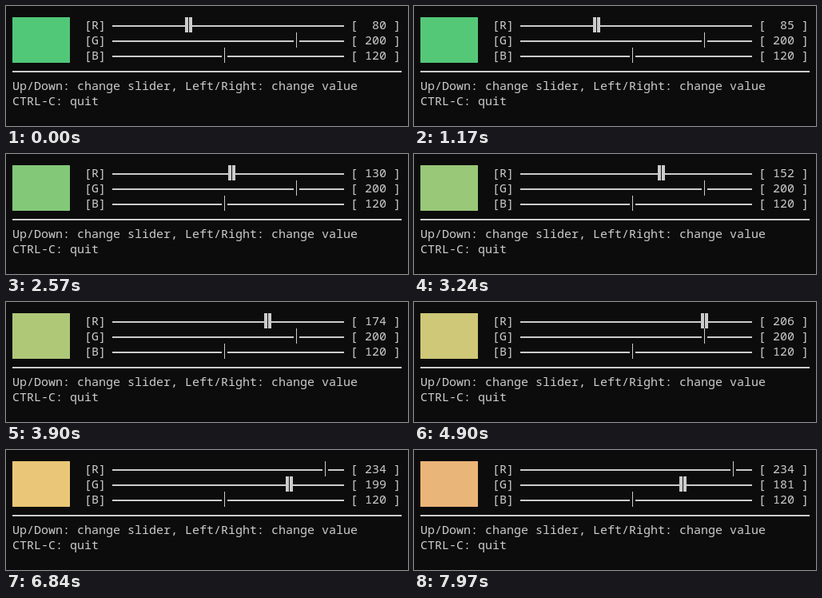
Write an HTML page that moves like this. It is 503x150 px and loops after 8 s.

```html
<!DOCTYPE html>
<html lang="en">
<head>
<meta charset="utf-8">
<title>Colour sliders</title>
<style>
html, body { margin: 0; width: 100%; height: 100%; overflow: hidden; background: #0c0c0c; }
svg { display: block; width: 503px; height: 150px; }
rect { shape-rendering: crispEdges; }
text { font: 500 15px "Noto Sans Mono", "DejaVu Sans Mono", monospace; fill: #ccc; }
</style>
</head>
<body>
<svg id="stage" viewBox="0 0 503 150"></svg>
<script>
const LOOP = 8000, CELL = 9, ROW = 19, LEFT = 8, TOP = 14;
const BG = '#0c0c0c', FG = '#cccccc';
const CELLS = 32, MAX = 255;
const RATE = 13 / 6; // value change per screen refresh while a key is held
const stage = document.getElementById('stage');

const colX = col => LEFT + col * CELL;
const rowY = row => TOP + row * ROW;

function add(tag, attrs) {
  const el = document.createElementNS('http://www.w3.org/2000/svg', tag);
  set(el, attrs);
  return stage.appendChild(el);
}
function set(el, attrs) {
  for (const key in attrs) el.setAttribute(key, attrs[key]);
}
function rect(x, y, width, height, fill) {
  return add('rect', { x, y, width, height, fill });
}
function label(col, row, str, anchor = 'start') {
  const el = add('text', { x: colX(col), y: rowY(row) + 15, 'text-anchor': anchor });
  el.textContent = str;
  return el;
}
function rule(col, row, cells) {
  rect(colX(col) - 1, rowY(row) + 10, cells * CELL + 2, 2, FG);
}

rect(0, 0, 503, 150, BG);
const swatch = rect(LEFT, TOP, 8 * CELL, 3 * ROW, BG);

const sliders = ['R', 'G', 'B'].map((name, row) => {
  label(10, row, `[${name}]`);
  rule(14, row, CELLS);
  label(47, row, '[');
  label(53, row, ']');
  return {
    gap: rect(0, rowY(row), CELL - 2, ROW, BG),
    bar: rect(0, rowY(row), 1, ROW, FG),
    value: label(52, row, '', 'end')
  };
});

rect(LEFT - 1 + 1, rowY(3) + 10, 54 * CELL + 1, 2, FG);
label(0, 4, 'Up/Down: change slider, Left/Right: change value');
label(0, 5, 'CTRL-C: quit');

// Refreshes (15 per second, on a 10 ms clock) since a key began repeating
const ticks = (t, start) => Math.floor((Math.floor(t / 10) * 10 - start) * 3 / 200);

function red(t) {
  if (t < 500) return 80;
  if (t < 1100) return 81;
  return Math.floor(83 + RATE * Math.min(ticks(t, 1100), 70) + 1e-6);
}
function green(t) {
  if (t < 6840) return 200;
  if (t < 7500) return 199;
  return Math.floor(197 - RATE * ticks(t, 7500));
}

function draw(t) {
  const rgb = [red(t), green(t), 120];
  const active = t < 6500 ? 0 : 1;
  swatch.setAttribute('fill', `rgb(${rgb})`);
  sliders.forEach((s, i) => {
    const on = i === active;
    const x = colX(14 + Math.floor(rgb[i] * CELLS / MAX));
    set(s.gap, { x: on ? x : x + 1, width: on ? CELL : CELL - 2, fill: on ? FG : BG });
    set(s.bar, { x: x + 4, fill: on ? BG : FG });
    s.value.textContent = rgb[i];
  });
}

function frame() {
  draw(performance.now() % LOOP);
  requestAnimationFrame(frame);
}
frame();
</script>
</body>
</html>
```
